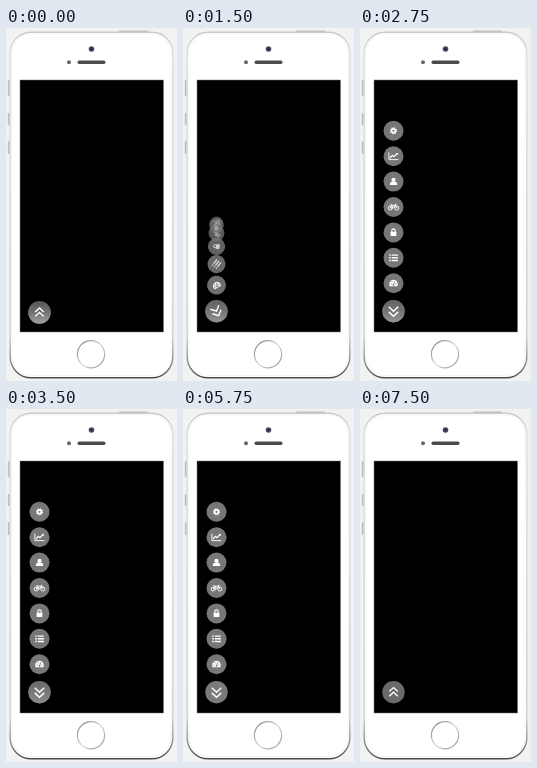
These frames come from a looping animation (171x353 px, 9 s). An HTML page:

```html
<!DOCTYPE html>
<html lang="en">
<head>
<meta charset="utf-8">
<title>Phone menu</title>
<style>
  html, body { margin: 0; width: 100%; height: 100%; overflow: hidden; background: #f2f2f2; }
  svg { display: block; width: 100vw; height: 100vh; }
</style>
</head>
<body>
<svg viewBox="0 0 171 353" xmlns="http://www.w3.org/2000/svg">
  <defs>
    <linearGradient id="rim" x1="0" y1="0" x2="0" y2="1">
      <stop offset="0" stop-color="#c9c9c9"/>
      <stop offset=".06" stop-color="#dedede"/>
      <stop offset=".88" stop-color="#d0d0d0"/>
      <stop offset=".96" stop-color="#858585"/>
      <stop offset="1" stop-color="#4c4c4c"/>
    </linearGradient>
    <linearGradient id="ring" x1="0" y1="0" x2="1" y2="1">
      <stop offset="0" stop-color="#777"/>
      <stop offset=".5" stop-color="#d8d8d8"/>
      <stop offset="1" stop-color="#8c8c8c"/>
    </linearGradient>
    <linearGradient id="shine" x1="0" y1="0" x2="0" y2="1">
      <stop offset="0" stop-color="#555"/>
      <stop offset=".55" stop-color="#777"/>
      <stop offset="1" stop-color="#a2a2a2"/>
    </linearGradient>
  </defs>

  <rect width="171" height="353" fill="#f2f2f2"/>
  <g fill="#bdbdbd">
    <rect x="113" y="2.6" width="29" height="2" rx="1"/>
    <rect x="1.8" y="52" width="2" height="16" rx=".8"/>
    <rect x="1.8" y="85" width="2" height="12" rx=".8"/>
    <rect x="1.8" y="113" width="2" height="13" rx=".8"/>
  </g>
  <rect x="4.2" y="4.2" width="162.6" height="345.6" rx="21" fill="#fff" stroke="url(#rim)" stroke-width="1.4"/>
  <rect x="6" y="6" width="159" height="341.5" rx="19.5" fill="#fff" stroke="#f1f1f1" stroke-width=".7"/>
  <circle cx="85.5" cy="21" r="2.8" fill="#4a4a5c"/>
  <circle cx="85.5" cy="21" r="1.2" fill="#25254a"/>
  <circle cx="63" cy="34.3" r="2" fill="#686868"/>
  <rect x="71.5" y="32.6" width="28" height="3.4" rx="1.7" fill="#4b4b4b"/>
  <rect x="14" y="52" width="143.5" height="252" fill="#000" stroke="#777" stroke-width=".5"/>
  <circle cx="85" cy="326.3" r="13.6" fill="#fff" stroke="url(#ring)" stroke-width="1.2"/>

  <g id="items"></g>
  <g id="button">
    <circle r="11.2" id="disc"/>
    <circle r="11.2" id="gloss" fill="url(#shine)"/>
    <path id="chevron" d="M-4.3 -.6L0 -4.6L4.3 -.6M-4.3 4L0 0L4.3 4" fill="none" stroke="#fff" stroke-width="1.3"/>
  </g>
</svg>
<script>
const LOOP = 9000, STEP = 250;
const X = 33.5, HOME = 283.2, FIRST = 255.2, GAP = 25.4;
const $ = id => document.getElementById(id);
const clamp = v => Math.max(0, Math.min(1, v));
const line = (d, w) => `<path d="${d}" fill="none" stroke="#fff" stroke-width="${w}"/>`;
const hole = (x, y, r) => `<circle cx="${x}" cy="${y}" r="${r}" fill="#777"/>`;

// from the button upwards
const icons = [
  `<path d="M-3.9 3A4.4 4.4 0 1 1 3.9 3Z" fill="#fff"/>` +
    hole(-2.5, .8, .6) + hole(-1.6, -1.5, .6) + hole(2.5, .8, .6) +
    `<path d="M0 1.8L1.2 -2" stroke="#777" stroke-width=".8"/>` + hole(0, 1.6, .9),
  line('M-4.3 -2.7h1.6M-4.3 0h1.6M-4.3 2.7h1.6M-1.8 -2.7h6.2M-1.8 0h6.2M-1.8 2.7h6.2', 1.4),
  `<rect x="-2.9" y="-.6" width="5.8" height="4.3" rx=".5" fill="#fff"/>` +
    line('M-1.7 -.4V-1.8A1.7 1.7 0 0 1 1.7 -1.8V-.4', 1.1),
  `<g fill="none" stroke="#fff" stroke-width=".9"><circle cx="-3.3" cy="1" r="2"/><circle cx="3.3" cy="1" r="2"/>` +
    `<path d="M-3.3 1L-1.7 -1.7H2L0 1H-3.3M0 1L-2 -2.5H-3M3.3 1L1.6 -2.7H2.8"/></g>`,
  `<circle cy="-1.7" r="2.1" fill="#fff"/><path d="M-3.7 3.5Q-3.7 .2 -1.6 .2H1.6Q3.7 .2 3.7 3.5Z" fill="#fff"/>`,
  line('M-4.6 -3.7V3.4H4.8', .9) + line('M-3.5 1.8L-1.1 -.8L.4 .5L3.5 -2.6', 1.2) +
    `<path d="M2 -3.3H4.4V-.9Z" fill="#fff"/>`,
  `<circle r="2.7" fill="#fff"/>` +
    `<circle r="3" fill="none" stroke="#fff" stroke-width="1.2" stroke-dasharray="1.18 1.18"/>` + hole(0, 0, 1.1)
];

$('items').innerHTML = icons.map(icon => `<g><circle r="10" fill="#777"/>${icon}</g>`).join('');
const items = [...$('items').children];

const easeOut = v => 1 - (1 - clamp(v)) ** 2;
const openTime = t => t < 5750 ? t - 1200 : (6200 - t) * 1.6;
const fade = (t, from, to) => t < from ? 0 : clamp(1 - (t - from) / (to - from));

function glossAt(t) {
  if (t < 1250) return fade(t, 0, 750);
  if (t < 5750) return .65 * fade(t, 2750, 5000) + (t < 2750 ? .65 : 0);
  return .7 * fade(t, 6000, 6750);
}

function draw(t) {
  const run = openTime(t);
  items.forEach((item, i) => {
    const e = easeOut((run - 32 * i) / 408);
    const y = HOME + (FIRST - GAP * i - HOME) * e;
    item.setAttribute('transform',
      `translate(${X} ${y}) rotate(${-450 * (1 - e)}) scale(${.2 + .8 * e})`);
    item.setAttribute('opacity', e);
  });
  const turn = easeOut(run / 480);
  const shine = glossAt(t);
  const drop = t < 750 ? shine * 1.3 : 0;
  const shade = Math.round(106 + 16 * turn);
  $('button').setAttribute('transform', `translate(${X} ${HOME + drop})`);
  $('disc').setAttribute('fill', `rgb(${shade},${shade},${shade})`);
  $('gloss').setAttribute('opacity', shine);
  $('chevron').setAttribute('transform', `rotate(${180 * turn}) scale(${1 + .1 * turn})`);
}

const start = performance.now();
function tick() {
  const t = (performance.now() - start) % LOOP;
  draw(Math.floor(t / STEP) * STEP);
  requestAnimationFrame(tick);
}
draw(0);
requestAnimationFrame(tick);
</script>
</body>
</html>
```
